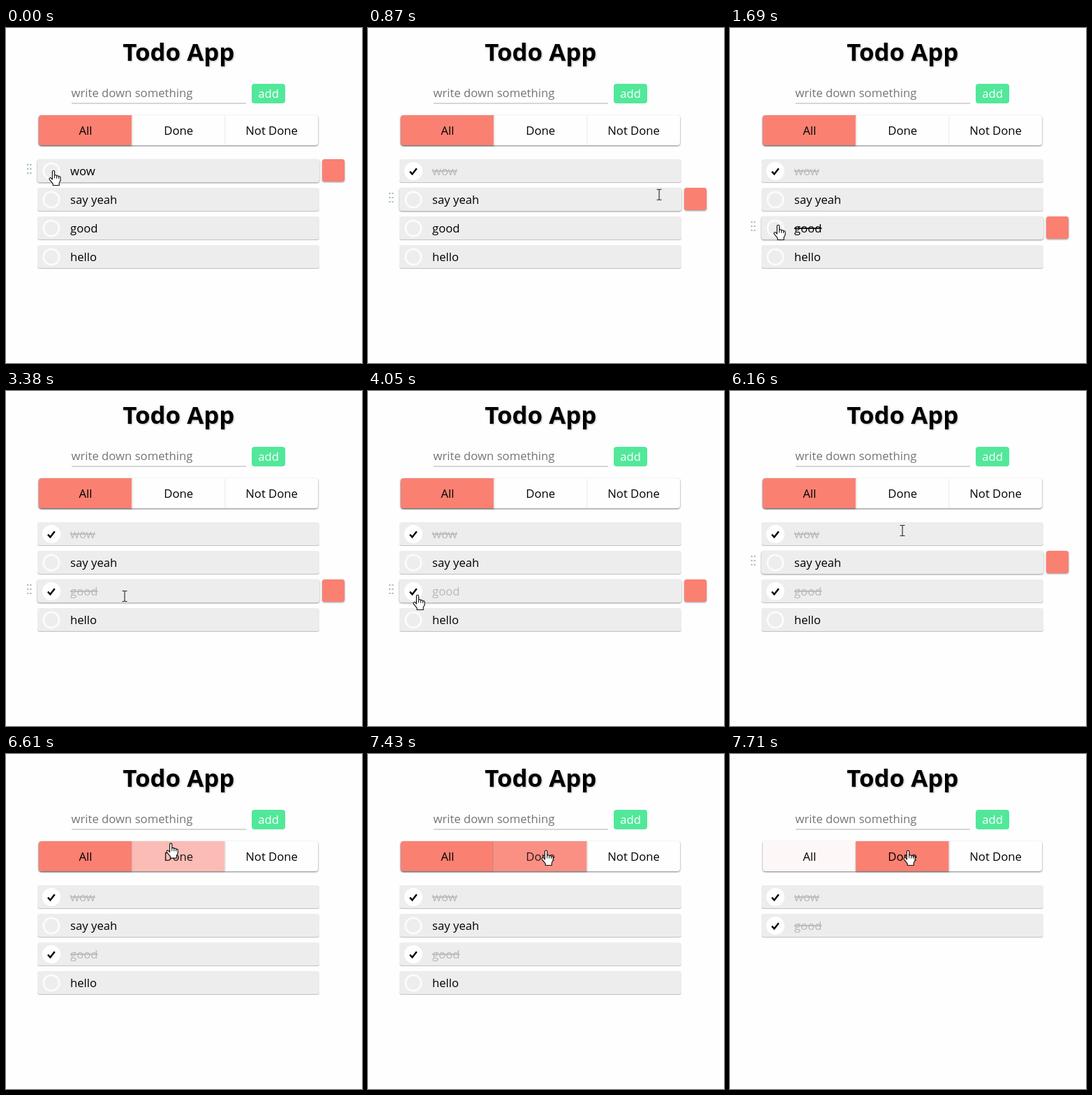
These frames come from a looping animation (510x480 px, 8000 ms). An HTML page:

```html
<!DOCTYPE html>
<html lang="en">
<head>
<meta charset="utf-8">
<title>Todo App</title>
<style>
  html, body { margin: 0; width: 100%; height: 100%; overflow: hidden; background: #fefefe; }
  svg { display: block; width: 510px; height: 480px; }
  text { font: 16.7px "Open Sans", "Noto Sans", sans-serif; }
  .mid { text-anchor: middle; }
  .title { font-size: 34.8px; font-weight: 700; filter: drop-shadow(1px 1px 1px rgba(0,0,0,.28)); }
  .low { filter: drop-shadow(0 1px .6px rgba(0,0,0,.24)); }
  .high { filter: drop-shadow(0 1px 1.2px rgba(0,0,0,.42)); }
  .bar { filter: drop-shadow(0 1px .8px rgba(0,0,0,.5)); }
</style>
</head>
<body>
<svg id="stage" viewBox="0 0 510 480">
  <text class="title mid" x="247.3" y="47">Todo App</text>
  <text x="93.5" y="99" fill="#757575">write down something</text>
  <rect x="94" y="107" width="250" height="2" fill="#d6d6d6"/>
  <rect x="352" y="80" width="48" height="28" rx="4" fill="#52e89a"/>
  <text class="mid" x="376" y="100" fill="#fff">add</text>
  <rect class="bar" x="47" y="125" width="400" height="43" rx="4" fill="#fefefe"/>
  <g id="tabs"></g>
  <g id="list"></g>
  <g id="cursor"></g>
</svg>
<script>
const LOOP = 8000, FILTER_AT = 7490;
const ROW_TOP = 188, ROW_STEP = 41;
const NS = "http://www.w3.org/2000/svg";
const $ = id => document.getElementById(id);

function add(parent, tag, attrs, text) {
  const el = document.createElementNS(NS, tag);
  for (const k in attrs) el.setAttribute(k, attrs[k]);
  if (text) el.textContent = text;
  parent.appendChild(el);
  return el;
}
const set = (el, k, v) => el.setAttribute(k, v);
const show = (el, on) => { el.style.display = on ? "" : "none"; };
const ramp = (t, a, b) => Math.min(1, Math.max(0, (t - a) / (b - a)));
const ease = p => p * p * (3 - 2 * p);

// Piecewise motion over keys [time, ...values]
function track(keys, t) {
  let i = 0;
  while (i < keys.length - 2 && t >= keys[i + 1][0]) i++;
  const a = keys[i], b = keys[i + 1];
  const p = ease(ramp(t, a[0], b[0]));
  return a.slice(1).map((v, n) => v + (b[n + 1] - v) * p);
}

// Tabs
const tabs = ["All", "Done", "Not Done"].map((name, i) => {
  const x = 47 + i * 133.4, r = x + 133.3;
  const d = i === 0 ? `M${r} 125H51q-4 0-4 4V164q0 4 4 4H${r}Z`
    : i === 2 ? `M${x} 125H443q4 0 4 4V164q0 4-4 4H${x}Z`
    : `M${x} 125H${r}V168H${x}Z`;
  if (i) add($("tabs"), "rect", { x: x - .5, y: 126, width: 1, height: 42, fill: "#e9e9e9" });
  const fill = add($("tabs"), "path", { d, fill: "#fa8072", class: "high" });
  return { name, x, fill };
});
tabs.forEach((tab, i) => {
  tab.label = add($("tabs"), "text", { class: "mid", x: 114 + i * 133.3, y: 153 }, tab.name);
});

// Todo rows
const rows = ["wow", "say yeah", "good", "hello"].map(name => {
  const g = add($("list"), "g", {});
  const box = add(g, "rect", { x: 45, width: 404, height: 33, rx: 3.5, fill: "#ededed" });
  const tools = add(g, "g", {});
  for (let n = 0; n < 6; n++)
    add(tools, "rect", { x: 30 + n % 2 * 4.2, y: 7 + (n >> 1) * 6, width: 2.3, height: 1.9, fill: "#a3bac2" });
  add(tools, "rect", { x: 453, width: 32, height: 32, rx: 3.5, fill: "#fa8072", class: "high" });
  add(g, "circle", { cx: 65, cy: 17, r: 11.2, fill: "none", stroke: "#fbfbfb", "stroke-width": 2.8 });
  const mark = add(g, "g", {});
  add(mark, "circle", { cx: 65, cy: 17, r: 13, fill: "#fff" });
  add(mark, "path", { d: "M60 17.6L63.4 21.3L69.8 13.2", fill: "none", stroke: "#000", "stroke-width": 2.4 });
  const label = add(g, "text", { x: 92, y: 23 }, name);
  return { g, box, tools, mark, label };
});

// Pointer shapes, each with its hot spot at 0,0
const shapes = {
  hand: add($("cursor"), "g", { "stroke-linejoin": "round", "stroke-linecap": "round" }),
  beam: add($("cursor"), "g", {}),
  arrow: add($("cursor"), "g", {})
};
add(shapes.hand, "path", {
  d: "M-1.6 11.5V1.8a1.6 1.6 0 0 1 3.2 0V7.2q2.6-1.2 3 .8 2.5-1 2.9 .9 2.6-.7 2.6 1.7V14.5L8.2 18V21.5H-.8V19.2L-5.6 13.2C-7 11.2-4.6 9.6-3.2 11.2L-1.6 13Z",
  fill: "#fff", stroke: "#111", "stroke-width": 1.15
});
add(shapes.hand, "path", { d: "M1.6 7V11M4.6 8V11.4M7.5 9V11.6", fill: "none", stroke: "#111" });
add(shapes.beam, "path", {
  d: "M-3.5-7.5H-1L0-6.8L1-7.5H3.5M0-7V7M-3.5 7.5H-1L0 6.8L1 7.5H3.5",
  fill: "none", stroke: "#222", "stroke-width": 1.1
});
add(shapes.arrow, "path", {
  d: "M0 0V16.5L3.8 13L6.4 19L9 17.9L6.4 12H11.6Z", fill: "#fff", stroke: "#111"
});

const path = [
  [0, 68, 204], [340, 68, 204], [560, 472, 232], [820, 472, 232], [1040, 69, 282],
  [1960, 69, 282], [2280, 183, 294], [3379, 183, 294], [3380, 170, 294],
  [3840, 71, 292], [5930, 71, 292], [6160, 247, 200], [6420, 240, 120],
  [6700, 235, 130], [6789, 235, 130], [6790, 255, 138], [8000, 255, 138]
];

function pointerKind(x, y) {
  if (y >= 124 && y < 169) return "hand";
  const inRow = y >= ROW_TOP && (y - ROW_TOP) % ROW_STEP < 34;
  if (!inRow || x > 449) return "arrow";
  return x < 82 ? "hand" : "beam";
}

// How far each row is checked, 0 to 1
function checked(i, t) {
  if (i === 0) return ramp(t, 220, 520);
  if (i !== 2) return 0;
  return t < 4050 ? ramp(t, 1690, 1990)
    : t < 5180 ? 1 - ramp(t, 4050, 4310)
    : ramp(t, 5180, 5480);
}

function struck(i, t) {
  if (i === 0) return t >= 220;
  return i === 2 && (t >= 1690 && t < 4050 || t >= 5180);
}

// Visibility of the drag handle and delete button
function hover(i, t) {
  const within = (a, b) => t >= a && t < b ? 1 : 0;
  if (i === 0) return within(0, 850) || within(6180, 6300);
  if (i === 1) return within(850, 950) || within(6060, 6180);
  if (i === 3) return 0;
  if (within(4050, 5000)) return 1 - ramp(t, 4050, 4310);
  if (within(5180, 5940)) return 1 - ramp(t, 5180, 5480);
  return within(950, 6060);
}

function draw(t) {
  const filtered = t >= FILTER_AT;
  const swap = ease(ramp(t, FILTER_AT - 30, 7720));
  const warm = .87 * ramp(t, 6480, 6700);
  set(tabs[0].fill, "opacity", 1 - .96 * swap);
  set(tabs[1].fill, "opacity", warm + (1 - warm) * swap);
  set(tabs[2].fill, "opacity", 0);
  set(tabs[1].label, "opacity", 1 - .18 * (warm / .87) * (1 - swap));

  let slot = 0;
  rows.forEach((row, i) => {
    const done = ease(checked(i, t)), over = hover(i, t);
    const visible = !filtered || struck(i, t);
    show(row.g, visible);
    if (!visible) return;
    set(row.g, "transform", `translate(0 ${ROW_TOP + ROW_STEP * slot++})`);
    set(row.box, "class", over > .5 ? "high" : "low");
    set(row.tools, "opacity", over);
    set(row.mark, "opacity", done);
    const c = Math.round(184 * done);
    set(row.label, "fill", `rgb(${c},${c},${c})`);
    row.label.style.textDecoration = struck(i, t) ? "line-through" : "none";
  });

  const [x, y] = track(path, t);
  const kind = pointerKind(x, y);
  for (const k in shapes) show(shapes[k], k === kind);
  set($("cursor"), "transform", `translate(${x.toFixed(1)} ${y.toFixed(1)})`);
}

function tick() {
  draw(performance.now() % LOOP);
  requestAnimationFrame(tick);
}
tick();
</script>
</body>
</html>
```
